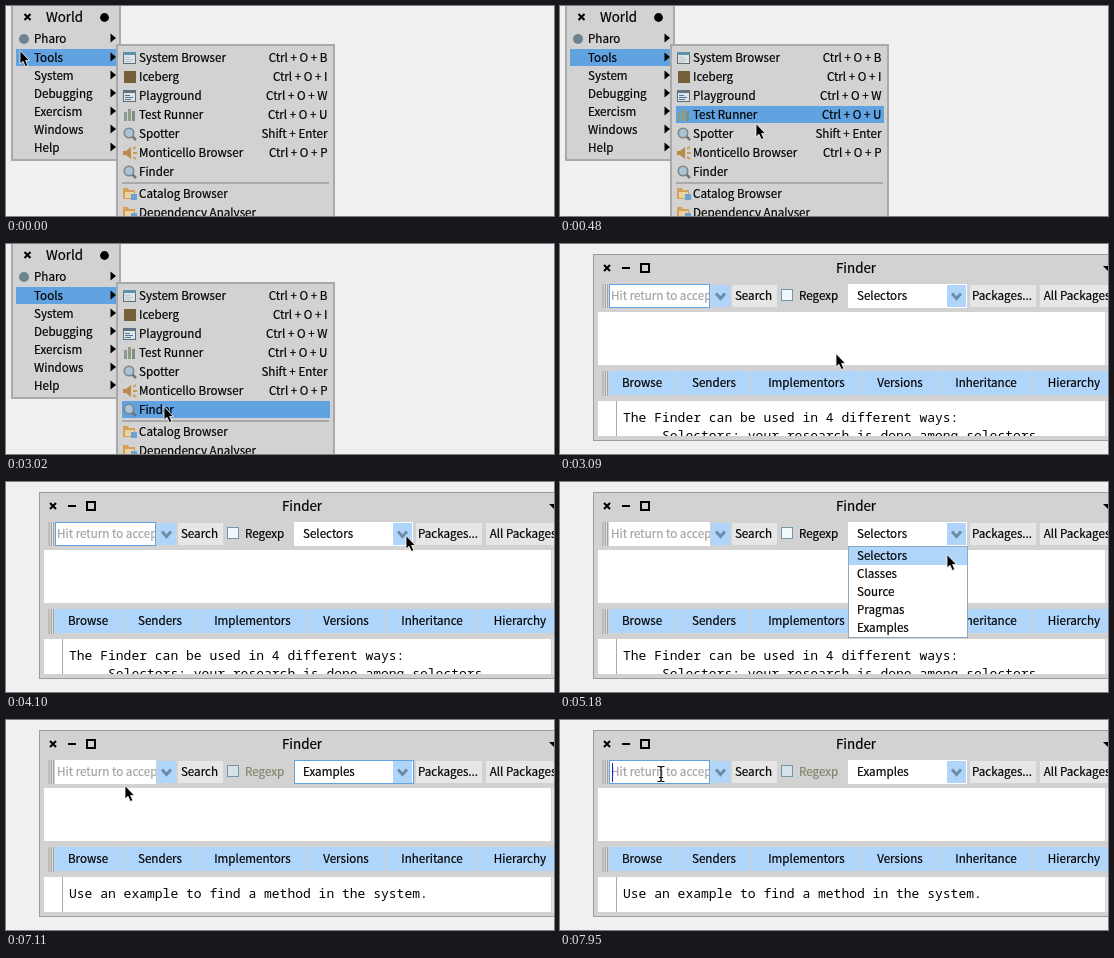
An HTML page that plays this animation: 548x210 px, repeating every 8000 ms.

```html
<!DOCTYPE html>
<html lang="en">
<head>
<meta charset="utf-8">
<title>Finder demo</title>
<style>
  html, body { margin: 0; width: 548px; height: 210px; overflow: hidden; background: #f0f0f0; }
  svg { display: block; }
  text { font: 11.64px "Noto Sans CJK JP", "Noto Sans CJK SC", "Noto Sans CJK", Lato, sans-serif; white-space: pre;
    fill: currentColor; stroke: currentColor; stroke-width: .2px; }
  .title { font-size: 13.4px; }
  .mono { font: 13px "Noto Sans Mono", "DejaVu Sans Mono", monospace; stroke: none; }
</style>
</head>
<body>
<svg id="stage" width="548" height="210"></svg>
<script>
const LOOP = 8000;
const GREY = '#d2d2d2', EDGE = '#a9a9a9', BLUE = '#61a2e0', PALE = '#b0d5fa';

// Box from corner to corner, with an optional 1px inner border.
const box = (x, y, x2, y2, fill, stroke, extra = '') => {
  const i = stroke ? 0.5 : 0;
  return `<rect x="${x + i}" y="${y + i}" width="${x2 - x - 2 * i}" height="${y2 - y - 2 * i}" ` +
    `fill="${fill}" ${stroke ? `stroke="${stroke}"` : ''} ${extra}/>`;
};
const panel = (x, y, x2, y2) => box(x, y, x2, y2, EDGE) + box(x + 2, y + 2, x2 - 2, y2 - 2, GREY);
const text = (x, y, s, extra = '') => `<text x="${x}" y="${y}" ${extra}>${s}</text>`;
const path = (d, fill, stroke = 'none', w = 1) =>
  `<path d="${d}" fill="${fill}" stroke="${stroke}" stroke-width="${w}"/>`;
const group = (id, body) => `<g id="${id}">${body}</g>`;
const at = (x, y, body) => `<g transform="translate(${x} ${y})">${body}</g>`;
const dot = (x, y, r, fill) => `<circle cx="${x}" cy="${y}" r="${r}" fill="${fill}"/>`;

// Icons, drawn around their own centre.
const lens = path('M2 2L6 6', 'none', '#75757a', 2.5) +
  '<circle cx="-1" cy="-1" r="4.7" fill="#a9c6d6" stroke="#7d8488" stroke-width="1.6"/>';
const sheet = (head, ink) => box(-7, -6, 6, 6, '#dfe4e4', '#5f6d74') + box(-7, -6, 6, -3, head) +
  path('M-5 -.5H0M-5 1.5H3M-5 3.5H1', 'none', ink);
const folder = path('M-7 -6H-2L-1 -4H5V5H-7Z', '#d3a257') + box(-5, -2, 4, 4, '#ead2a4') +
  box(1, 0, 7, 6, '#69a3d6');
const bars = box(-6, -3, -3, 6, '#8b9a8d') + box(-2, -6, 1, 6, '#8f9d84') + box(2, -4, 5, 6, '#7f8f88');
const horn = path('M-7 -2H-4L1 -6V6L-4 2H-7Z', '#b98a48') + path('M3 -4L6 -6M3 0H7M3 4L6 6', 'none', '#c99c5c', 2);

const tools = [
  ['System Browser', 'Ctrl + O + B', sheet('#5c93aa', '#b8c6cc')],
  ['Iceberg', 'Ctrl + O + I', box(-6, -6, 6, 6, '#76603a')],
  ['Playground', 'Ctrl + O + W', sheet('#62717d', '#4f75a3')],
  ['Test Runner', 'Ctrl + O + U', bars],
  ['Spotter', 'Shift + Enter', lens],
  ['Monticello Browser', 'Ctrl + O + P', horn],
  ['Finder', '', lens],
  ['Catalog Browser', '', folder],
  ['Dependency Analyser', '', folder],
];
const world = ['Pharo', 'Tools', 'System', 'Debugging', 'Exercism', 'Windows', 'Help'];

const menus = () => panel(5, -4, 115, 155) +
  path('M18.5 8L24.5 14M24.5 8L18.5 14', 'none', '#000', 2) +
  text(40, 16, 'World', 'class="title"') + dot(98.5, 11.5, 4.4, '#000') +
  box(10, 43, 113, 60, BLUE) + dot(18, 33, 5, '#6d8390') +
  world.map((s, i) => {
    const y = i ? 33 + 18 * i : 32;
    return text(28, y + 5, s) + path(`M104.5 ${y - 4.5}L110 ${y}L104.5 ${y + 4.5}Z`, '#000');
  }).join('') +
  panel(110, 38, 329, 220) + box(116, 0, 324, 17, BLUE, '', 'id="hover"') +
  box(116, 176, 323, 178, EDGE) +
  tools.map(([name, keys, icon], i) => {
    const y = 51 + 19 * i + (i > 6 ? 3 : 0);
    return at(124, y + 1, icon) + text(133, y + 5, name) + text(321.5, y + 5, keys, 'text-anchor="end"');
  }).join('') +
  group('tip', box(219, 130, 346, 158, '#ffffb5', '#8a8a72') +
    text(222.5, 148, 'Looking for something ?', 'style="font-size:10.8px"'));

const grip = (y, y2) => box(42, y, 44, y2, '#bcbcbc') + box(45, y, 48, y2, '#a2a2a2') + box(46, y, 47, y2, '#e4e4e4');
const dropButton = x => box(x, 41, x + 19, 63, PALE) +
  path(`M${x + 5} 49.5L${x + 9.5} 54.5L${x + 14} 49.5`, 'none', '#6f8ba6', 3);
const button = (x, x2, cx, s) => box(x, 41, x2, 63, '#e6e6e6') + text(cx, 56, s, 'text-anchor="middle"');

const actions = [[49, 116, 82, 'Browse'], [117, 190, 154, 'Senders'], [191, 300, 246.5, 'Implementors'],
  [301, 378, 340, 'Versions'], [379, 471, 426, 'Inheritance'], [472, 560, 514, 'Hierarchy']];

const finder = () => box(33, 10, 570, 197, GREY, '#9c9c9c') +
  path('M44 21L50 27M50 21L44 27', 'none', '#000', 2) + box(62, 23, 70, 25, '#000') +
  path('M81 20H89V28H81Z', 'none', '#000', 2) + path('M543 22H553L548 27Z', '#000') +
  text(296, 29, 'Finder', 'class="title" text-anchor="middle"') +
  grip(40, 64) + box(49, 40, 150, 64, '#fff') +
  '<clipPath id="field"><path d="M50 40H150V64H50Z"/></clipPath>' +
  `<g clip-path="url(#field)">${text(51, 56, 'Hit return to accept', 'color="#a3a3a3"')}</g>` +
  box(49, 40, 150, 64, 'none', BLUE, 'id="fieldFocus"') +
  box(52, 43, 53, 62, '#2222d0', '', 'id="caret"') +
  dropButton(151) + button(172, 217, 193.5, 'Search') +
  box(221, 45, 233, 57, '#f1f8fb', '#7696a8', 'id="check"') + text(239, 56, 'Regexp', 'id="regexp"') +
  box(288, 40, 407, 64, '#fff') + text(297, 56, '', 'id="mode"') + dropButton(387) +
  box(288, 40, 408, 64, 'none', BLUE, 'id="comboFocus"') +
  button(410, 476, 442, 'Packages...') + button(480, 560, 517, 'All Packages') +
  box(38, 68, 545, 121, '#fff') + box(546, 68, 548, 121, '#e4e4e4') +
  grip(127, 152) +
  actions.map(([x, x2, cx, s]) => box(x, 127, x2, 151, PALE) + text(cx, 143, s, 'text-anchor="middle"')).join('') +
  box(38, 157, 545, 192, '#fff') + box(56, 157, 57, 192, '#a8a8a8') + box(546, 157, 548, 192, '#e4e4e4') +
  '<clipPath id="pane"><path d="M57 157H545V192H57Z"/></clipPath>' +
  `<g clip-path="url(#pane)">${text(63, 178, '', 'class="mono" id="line1"')}` +
  `${text(102, 196, 'Selectors: your research is done among selectors', 'class="mono" id="line2"')}</g>` +
  group('list', box(288, 64, 408, 156, '#fff', '#8fa9c0') + box(289, 65, 407, 83, PALE) +
    ['Selectors', 'Classes', 'Source', 'Pragmas', 'Examples']
      .map((s, i) => text(297, 78 + 18 * i, s)).join(''));

const stage = document.getElementById('stage');
stage.innerHTML = group('menus', menus()) + group('finder', finder()) +
  '<circle id="click" r="15" fill="#f2e63a" opacity=".7"/>' +
  group('arrow', path('M0 -.5V13L3 10.3L5.3 15.5L7.8 14.4L5.6 9.4H9.5Z', '#000', '#fff', 0.8)) +
  group('beam', path('M-3.5 -7.5H-1L0 -6.5L1 -7.5H3.5M0 -6.5V6.5M-3.5 7.5H-1L0 6.5L1 7.5H3.5M-2 3.5H2', 'none', '#000', 1.2));
const $ = id => document.getElementById(id);
const show = (id, on) => $(id).setAttribute('display', on ? 'inline' : 'none');

// Pointer moves: first step, last step, number of steps, then evenly timed waypoints.
const moves = [
  [0, 0, 1, [14, 45]],
  [80, 870, 11, [48, 47], [86, 50], [122, 56], [152, 76], [178, 100], [196, 118],
    [206, 134], [211, 147], [215, 157], [220, 162], [223, 163]],
  [1870, 1870, 1, [158, 163]],
  [3090, 3090, 1, [276, 110]],
  [3240, 3700, 7, [318, 92], [350, 78], [372, 69], [386, 63], [394, 60], [397, 59], [398, 59]],
  [3870, 4100, 4, [400, 54]],
  [5100, 5710, 9, [380, 82], [352, 126], [339, 145]],
  [5880, 5880, 1, [338, 145]],
  [6570, 7340, 11, [285, 121], [190, 86], [112, 64], [79, 58]],
  [7410, 7570, 3, [73, 55]],
  [7950, 7950, 1, [101, 54]],
];
const clicks = [[2020, 3020], [4410, 4640], [6190, 6340], [7720, 7950]];

function pointer(t) {
  const i = moves.findLastIndex(m => m[0] <= t);
  const [t0, t1, n, ...way] = moves[i];
  if (t >= t1) return way.at(-1);
  const step = 1 + Math.floor((t - t0) / (t1 - t0) * (n - 1));
  const nodes = [moves[i - 1].at(-1), ...way];
  const u = step / n * way.length, k = Math.min(Math.floor(u), way.length - 1);
  return nodes[k].map((a, d) => Math.round(a + (nodes[k + 1][d] - a) * (u - k)));
}

function draw(t) {
  const within = (a, b) => t >= a && t < b;
  const [x, y] = pointer(t);
  const open = t >= 3090, examples = t >= 6190;
  show('menus', !open);
  show('finder', open);

  const row = Math.floor((y - 42.5) / 19);
  show('hover', x > 112 && row >= 0);
  $('hover').setAttribute('y', 43 + 19 * row);
  show('tip', within(870, 1870));

  show('fieldFocus', !within(4640, 7720));
  show('caret', within(3547, 4100) || t >= 7720);
  show('comboFocus', within(6190, 7720));
  show('list', within(4640, 6190));
  $('mode').textContent = examples ? 'Examples' : 'Selectors';
  $('regexp').setAttribute('color', examples ? '#84846a' : '#000');
  $('check').setAttribute('fill', examples ? '#d3e3e8' : '#f1f8fb');
  $('line1').textContent = examples ? 'Use an example to find a method in the system.'
    : 'The Finder can be used in 4 different ways:';
  show('line2', !examples);

  const inField = open && x > 49 && x < 150 && y > 40 && y < 64;
  const place = `translate(${x} ${y})`;
  show('click', clicks.some(c => within(...c)));
  show('arrow', !inField);
  show('beam', inField);
  for (const id of ['click', 'arrow', 'beam']) $(id).setAttribute('transform', place);
}

function tick() {
  draw(performance.now() % LOOP);
  requestAnimationFrame(tick);
}
tick();
</script>
</body>
</html>
```
